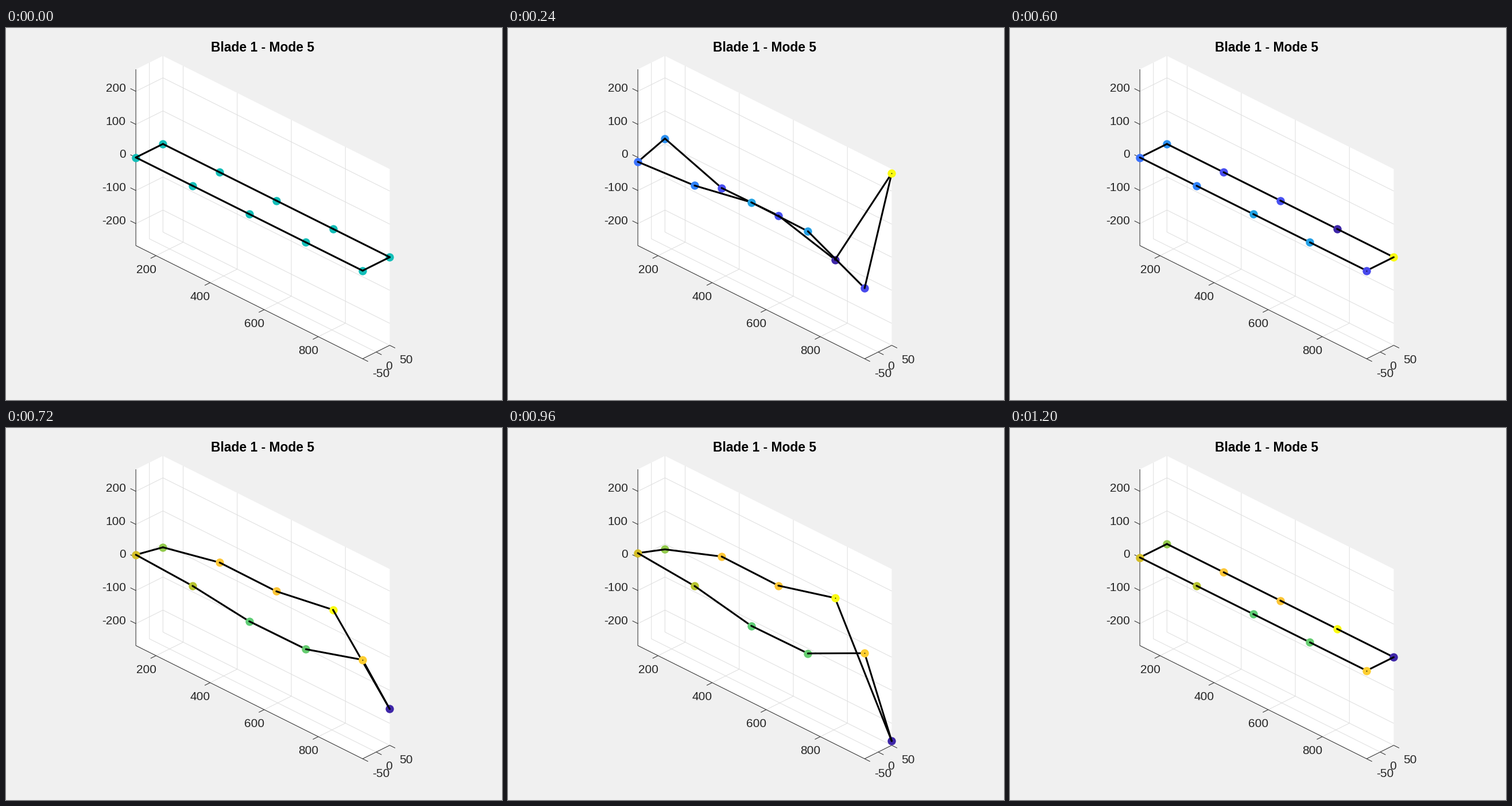
Animation of 864 by 648 pixels, one loop 1260 ms. Source, as a matplotlib script:

```python
import numpy as np
import matplotlib.pyplot as plt
from matplotlib.animation import FuncAnimation
from matplotlib.colors import LinearSegmentedColormap

W, H, DPI = 864, 648, 100
STEPS = 21
PT = 72 / DPI

INK = "#262626"
GRID = "#dedede"

# Box corner, and the screen vectors of the three axes.
CORNER = np.array([226.2, 379.0])
LONG = np.array([395.0, 197.2])
DEEP = np.array([47.2, -23.5])
TALL = np.array([0.0, -307.0])

# Screen displacement of each node (positive is up), front row then back row.
FRONT = [-8.0, 0.4, 21.5, 20.3, -32.0]
BACK = [9.9, -28.8, -27.4, -56.5, 153.6]

PALETTE = LinearSegmentedColormap.from_list("heat", [
    (0.00, "#3e26a8"), (0.06, "#4537d0"), (0.12, "#484bef"),
    (0.17, "#475df9"), (0.22, "#3e6fff"), (0.27, "#2f82fa"),
    (0.32, "#2b92ee"), (0.37, "#22a1e4"), (0.44, "#0fb2d2"),
    (0.50, "#12beb9"), (0.57, "#38c896"), (0.63, "#60cc73"),
    (0.68, "#8dcb50"), (0.73, "#b7c430"), (0.77, "#d4be28"),
    (0.81, "#f0ba36"), (0.87, "#fec736"), (1.00, "#fafb12"),
])

fig = plt.figure(figsize=(W / DPI, H / DPI), dpi=DPI, facecolor="#f0f0f0")
ax = fig.add_axes([0, 0, 1, 1])
ax.set_xlim(0, W)
ax.set_ylim(H, 0)
ax.axis("off")


def place(u, v, w=0.0):
    """Screen point for box fractions along, across and up."""
    return CORNER + u * LONG + v * DEEP + w * TALL


def stroke(points, color, width=1.0, zorder=2):
    xs, ys = zip(*points)
    return ax.plot(xs, ys, color=color, lw=width * PT, zorder=zorder,
                   solid_capstyle="butt")[0]


def label(x, y, text, ha="center", size=20.83, weight="normal", color=INK):
    ax.text(x, y, text, ha=ha, va="baseline", color=color, weight=weight,
            family="Liberation Sans", fontsize=size * PT, zorder=4)


def tick(start, direction):
    step = np.array(direction) * 10.6 / np.hypot(*direction)
    stroke([start, start + step], INK, zorder=3)


def draw_box():
    outline = [place(0, 0), place(0, 0, 1), place(0, 1, 1),
               place(1, 1, 1), place(1, 1), place(1, 0)]
    ax.fill(*zip(*outline), color="white", lw=0, zorder=1)

    for i, value in enumerate(range(-200, 201, 100)):
        w = 0.5 + value * 0.576 / 307
        stroke([place(0, 0, w), place(0, 1, w), place(1, 1, w)], GRID)
        tick(place(0, 0, w), -LONG)
        label(208.7, 341.5 - 57.6 * i, str(value), ha="right")

    for i, value in enumerate(range(200, 801, 200)):
        u = (35.2 + 94.2 * i) / 395
        stroke([place(u, 0), place(u, 1), place(u, 1, 1)], GRID)
        tick(place(u, 0), -DEEP)
        label(244 + 94.1 * i, 427 + 47 * i, str(value))

    for v, x, y, text in [(0, 653.3, 607.5, "-50"), (0.5, 667.5, 595.3, "0"),
                          (1, 696.6, 583.5, "50")]:
        if v:
            stroke([place(1, v), place(0, v), place(0, v, 1)], GRID)
        tick(place(1, v), LONG)
        label(x, y, text)

    stroke([place(0, 0, 1), place(0, 0), place(1, 0), place(1, 1)],
           INK, zorder=3)
    label(447.3, 41.3, "Blade 1 - Mode 5", size=22.9, weight="bold",
          color="black")


draw_box()

# Nodes run along the front edge and return along the back edge.
u = np.array([0, 1, 2, 3, 4, 4, 3, 2, 1, 0]) / 4
v = np.repeat([0, 1], 5)
rest = np.array([place(a, b, 0.5) for a, b in zip(u, v)])
shape = np.array(FRONT + BACK[::-1])
links = [(i, (i + 1) % len(shape)) for i in range(len(shape))]

bars = [ax.plot([], [], color="black", lw=3.1 * PT,
                solid_capstyle="round")[0] for _ in links]
dots = [ax.plot([], [], "o", ms=14.4 * PT, mew=0)[0] for _ in shape]
pins = [ax.plot([], [], "o", ms=1.8 * PT, mew=0, color="black")[0]
        for _ in shape]


def heat(step):
    if step == 0:
        return np.full(len(shape), 0.5)
    signed = shape if step <= 10 else -shape
    return (signed - signed.min()) / np.ptp(signed)


def update(step):
    rise = shape * np.sin(2 * np.pi * step / (STEPS - 1))
    pos = rest - np.column_stack([np.zeros_like(rise), rise])
    # Nearness to the viewer decides what covers what.
    near = 1000 + 0.866 * (LONG[0] * u - DEEP[0] * v) + 0.577 * rise

    for bar, (a, b) in zip(bars, links):
        bar.set_data(pos[[a, b], 0], pos[[a, b], 1])
        bar.set_zorder(5000 if step == 0 else (near[a] + near[b]) / 2)

    for dot, pin, p, z, c in zip(dots, pins, pos, near, PALETTE(heat(step))):
        dot.set_data([p[0]], [p[1]])
        dot.set_color(c)
        dot.set_zorder(z)
        pin.set_data([p[0]], [p[1]])
        pin.set_zorder(z + 0.1)
    return bars + dots + pins


anim = FuncAnimation(fig, update, frames=STEPS, interval=60, repeat=True,
                     repeat_delay=0, blit=False)
plt.show()
```
